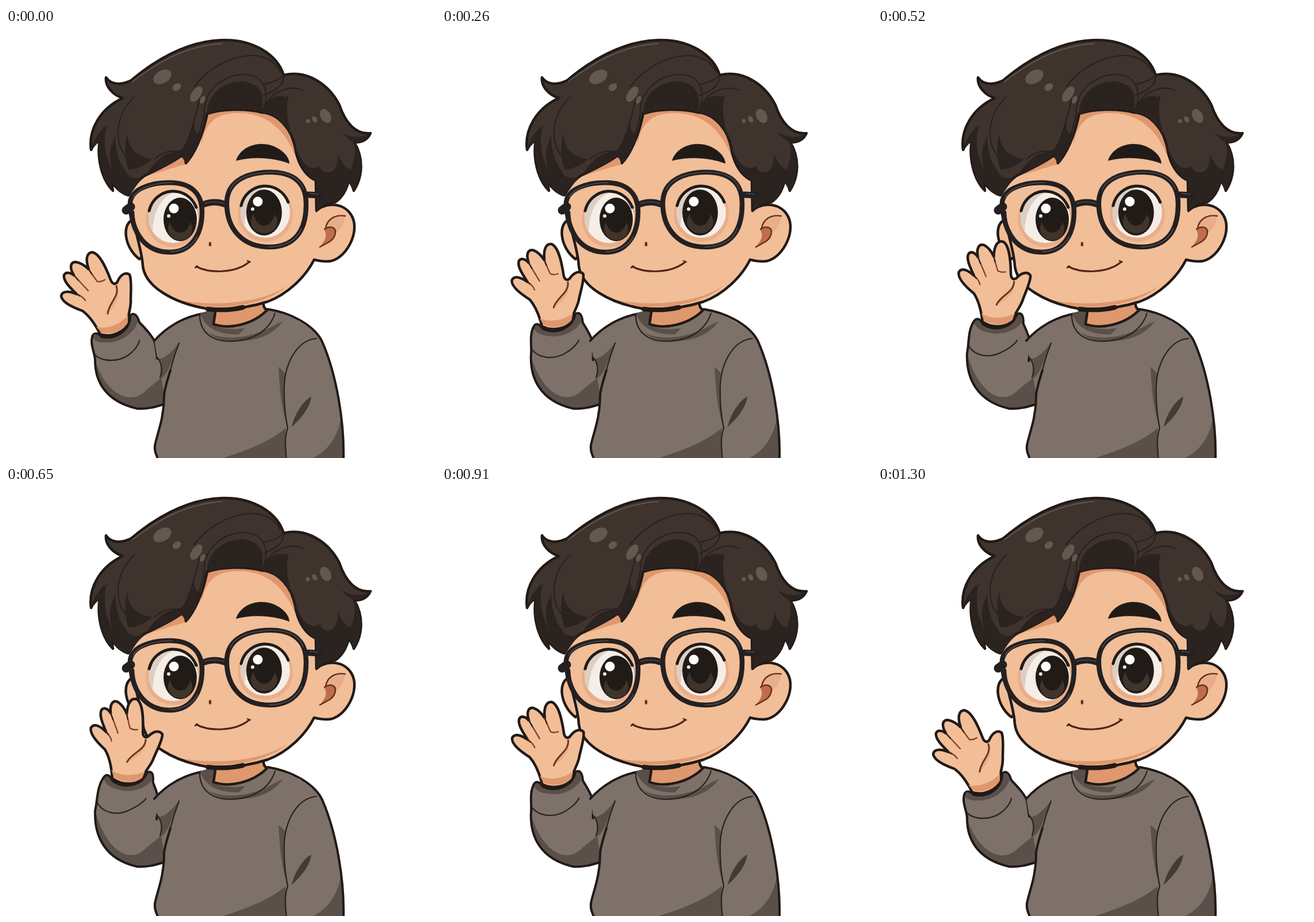
Write an HTML page that moves like this. It is 748 by 748 pixels and loops after 1.43 s.

```html
<!DOCTYPE html>
<html lang="en">
<head>
<meta charset="utf-8">
<title>Waving character</title>
<style>
  html, body { margin: 0; width: 100%; height: 100%; overflow: hidden; background: #fff; }
  svg { display: block; width: 100vw; height: 100vh; }
  .ink { fill: none; stroke: #211a17; stroke-width: 4; }
  .fine { fill: none; stroke: #2a211d; stroke-width: 2.2; }
  .edge { stroke: #211a17; stroke-width: 4.5; }
  .wool { fill: #7e716a; }
  .woolShade { fill: #5b4f49; }
  .skin { fill: #f1be98; }
  .skinShade { fill: #df986d; }
  .blush { fill: #e8ae89; }
  .hair { fill: #3f332e; }
  .hairShade { fill: #2b2320; }
  .shine { fill: #65584f; }
  .crease { fill: none; stroke: #8b4229; stroke-width: 2.4; }
  .dark { fill: #211b18; }
  .lid { fill: none; stroke: #211b18; stroke-width: 5; }
  .frame { fill: none; stroke: #242021; stroke-width: 8.5; }
  .glint { fill: none; stroke: #514b4a; stroke-width: 1.6; }
</style>
</head>
<body>
<svg viewBox="0 0 748 748" stroke-linecap="round" stroke-linejoin="round">
  <g id="sleeve">
    <path class="wool" data-bend="M150 537 C146 552 155 565 155 579 C155 612 171 649 228 662 C245 663 258 660 276 654 L330 600 L310 515 L258 544 C251 531 239 519 232 512 C230 502 225 496 217 498 C205 520 180 536 150 537 Z"/>
    <path class="woolShade" data-bend="M155 579 C176 640 218 657 244 630 C257 619 268 611 281 598 L275 655 C256 660 245 663 228 662 C171 649 155 612 155 579 Z"/>
    <path class="woolShade" data-bend="M150 539 C155 530 161 532 166 537 C190 541 215 527 216 503 C222 494 228 505 229 511 C222 532 200 546 178 547 C163 548 155 545 150 539 Z"/>
    <path class="fine" data-bend="M153 567 C168 583 197 580 213 569 C223 562 231 551 232 543"/>
    <path class="ink" data-bend="M276 654 C258 660 245 663 228 662 C171 649 155 612 155 579 C155 565 146 552 150 537 C152 530 159 529 166 537 C190 543 217 526 216 500 C224 493 229 502 232 512 C239 519 251 531 258 544 C261 555 262 566 263 575"/>
  </g>

  <g id="body">
    <path class="wool" d="M341 497 C308 503 278 521 258 544 L263 573 C270 586 272 594 270 607 L275 640 C275 680 263 705 259 726 C258 738 262 743 265 752 H587 C589 690 580 630 555 560 C545 523 500 501 455 489 Z"/>
    <path class="woolShade" d="M301 548 C291 568 285 600 270 610 C272 596 272 584 264 576 C282 573 289 561 301 548 Z"/>
    <path class="woolShade" d="M371 750 C420 735 462 718 486 696 L488 750 Z M530 750 C561 737 577 710 583 677 C588 705 588 730 587 750 Z"/>
    <path class="woolShade" d="M474 589 C476 625 478 660 490 695 L484 645 C483 625 484 610 485 600 Z"/>
    <path style="fill:#453a35" d="M497 694 C501 674 516 649 531 641 C529 661 513 679 497 694 Z"/>
    <path class="ink" d="M341 497 C308 503 278 521 258 544 M286 595 C280 616 275 630 275 640 C275 680 263 705 259 726 C258 738 262 743 265 752 M455 489 C500 496 540 521 551 548 C575 604 589 686 587 752"/>
    <path class="fine" d="M301 548 Q292 571 286 595 M540 540 C506 543 486 583 484 621 C483 660 487 680 490 696 C484 712 486 732 488 750 M263 573 C272 583 272 598 268 608"/>
    <path class="woolShade" d="M337 497 C337 512 343 522 352 530 C381 545 430 540 470 515 L482 510 C470 526 452 538 430 542 C390 550 340 545 337 497 Z"/>
    <path class="wool" d="M345 496 C347 516 360 532 390 535 C425 536 451 519 464 499 L451 488 L360 493 Z"/>
    <path class="woolShade" d="M337 496 L363 489 L361 515 C370 523 391 526 416 522 L405 533 C367 533 347 522 337 496 Z"/>
    <path class="fine" d="M337 497 C336 529 358 545 390 545 C432 544 459 525 468 496"/>
    <path class="skinShade edge" d="M366 481 L361 515 C388 525 429 516 454 491 C448 487 447 482 448 469 Z"/>
  </g>

  <g id="head">
    <path class="skin edge" d="M223 333 C201 337 204 381 232 402 L246 390 Z"/>
    <path class="skin edge" d="M535 322 C552 302 587 302 601 326 C618 354 590 406 559 406 C545 406 537 404 529 400 Z"/>
    <path class="blush" d="M555 352 C556 332 568 324 589 326 C591 342 575 359 573 356 Z"/>
    <path d="M553 350 C561 341 573 345 573 355 C573 371 557 374 546 381 C556 369 560 360 553 350 Z" fill="#c06d4e"/>
    <path class="crease" d="M556 348 C559 332 573 324 590 327 M554 350 C567 342 574 349 573 356 C571 372 556 374 546 381" style="stroke:#64301f"/>
    <path class="skin" d="M221 285 C218 335 236 373 238 414 C242 450 291 478 348 488 C385 491 421 487 455 476 C490 463 521 433 536 403 L541 285 C531 180 466 125 390 125 C310 128 223 210 221 285 Z"/>
    <path class="skinShade" d="M280 468 C340 486 440 483 490 448 C455 479 401 487 348 485 C320 480 297 475 280 468 Z"/>
    <path class="edge" fill="none" d="M221 320 C222 353 236 381 238 414 C242 450 291 478 348 488 C385 491 421 487 455 476 C490 463 521 433 536 403"/>
    <path d="M351 489 C368 491 391 491 412 486" fill="none" stroke="#211a17" stroke-width="8"/>
    <path class="skinShade" d="M340 203 C346 166 365 149 400 148 C450 146 482 173 502 219 C518 246 526 255 537 262 L520 180 L440 135 L340 135 Z"/>
    <path class="skinShade" d="M238 259 C263 243 293 229 315 221 L313 237 C290 243 261 253 238 259 Z"/>

    <path class="hair edge" d="M174 86 C183 99 200 100 218 91 C256 59 310 23 376 21 C429 19 472 46 483 82 C523 72 562 98 580 134 C590 164 608 186 634 183 C629 194 619 199 606 199 C622 226 621 258 605 283 C603 275 600 270 596 266 C592 283 584 295 573 303 C560 303 548 310 540 318 L539 265 C520 257 507 235 503 208 C498 179 475 149 446 147 C414 139 375 141 350 149 C342 188 328 219 313 235 C313 228 309 224 305 222 C293 232 262 247 243 256 C230 263 222 277 213 291 C202 288 193 281 183 267 L186 283 C166 263 158 226 163 195 C156 200 151 205 148 212 C143 177 164 140 203 122 C185 116 172 101 174 86 Z"/>
    <path class="hairShade" d="M148 211 C154 190 163 179 176 170 C168 192 172 224 185 248 C176 216 183 205 190 188 C190 212 197 235 208 248 C210 258 222 264 238 259 L213 291 C199 287 190 278 183 267 L186 283 C166 261 158 226 163 195 Z"/>
    <path class="hairShade" d="M212 182 C210 203 222 224 255 228 C240 240 225 246 213 246 C206 226 205 202 212 182 Z M245 254 C258 230 282 217 306 211 C316 196 322 182 326 163 C329 182 333 188 341 181 C334 205 325 222 313 235 L305 222 C290 235 264 247 245 254 Z"/>
    <path class="hairShade" d="M350 149 C349 117 377 93 409 93 C438 94 453 112 445 146 C416 138 380 140 350 149 Z M446 146 C451 121 472 115 489 120 C483 147 493 188 514 233 C509 228 505 216 503 208 C498 179 475 149 446 147 Z"/>
    <path class="hairShade" d="M507 214 C517 240 531 249 547 240 C548 250 558 254 568 249 C576 241 578 230 577 217 C583 234 590 243 600 246 C606 231 608 215 606 199 C622 226 621 258 605 283 L596 266 C592 283 584 295 573 303 C560 303 548 310 540 318 L539 265 C524 259 512 241 507 214 Z M584 180 C597 191 613 193 632 184 C628 193 619 199 606 199 C597 195 590 190 584 180 Z"/>
    <path class="fine" d="M483 82 C484 98 471 109 448 117 M483 82 C474 92 459 96 447 98 M327 102 C351 72 386 50 424 48 C449 46 470 60 477 76 M345 149 C342 108 381 78 418 81 C448 83 461 111 446 146 M363 143 C362 118 376 102 397 99 M382 141 C383 121 390 109 403 101 M399 96 C424 101 431 120 429 141 M411 93 C439 103 446 120 440 144 M449 139 C459 113 490 98 516 108 M490 119 C481 154 500 211 519 239 M224 119 C194 147 185 191 207 222 M337 123 C329 157 322 183 309 211 M345 149 C339 179 329 206 313 228 M170 174 C162 191 166 216 173 234"/>
    <path class="fine" d="M220 93 C261 61 312 31 376 27" style="stroke:#62554d"/>
    <path class="fine" d="M252 249 C266 224 285 213 309 218 M258 228 C276 213 294 211 310 220"/>
    <g class="shine">
      <ellipse cx="272" cy="85" rx="17" ry="11" transform="rotate(-30 272 85)"/>
      <ellipse cx="297" cy="103" rx="8" ry="6" transform="rotate(-35 297 103)"/>
      <ellipse cx="331" cy="115" rx="8" ry="15" transform="rotate(34 331 115)"/>
      <ellipse cx="342" cy="125" rx="4" ry="7" transform="rotate(28 342 125)"/>
      <ellipse cx="556" cy="153" rx="9" ry="13" transform="rotate(-28 556 153)"/>
      <ellipse cx="537" cy="159" rx="4" ry="6" transform="rotate(-28 537 159)"/>
      <circle cx="525" cy="162" r="3.5"/>
    </g>

    <path class="dark" d="M400 231 C408 206 438 196 464 205 C484 213 493 226 493 236 C466 225 429 223 400 231 Z"/>
    <g id="eyes"></g>

    <path class="frame" d="M216 303 C219 281 248 269 285 269 C322 269 341 288 341 320 C341 362 320 390 285 390 C244 390 218 360 216 303 Z"/>
    <path class="frame" d="M384 305 C384 270 412 254 450 251 C496 248 522 266 522 305 C523 355 500 381 458 381 C412 381 384 350 384 305 Z"/>
    <path class="frame" style="stroke-width:11" d="M343 307 Q363 299 382 307 M526 290 L547 291"/>
    <path class="frame" style="stroke-width:15" d="M209 317 L217 311"/>
    <path class="glint" d="M221 294 C231 277 260 269 289 269 M390 281 C400 259 428 253 455 251 C488 249 511 260 517 280 M346 305 Q362 300 379 305 M529 288 L543 289 M285 389 C307 389 326 378 333 362 M457 381 C489 380 507 367 514 348"/>
    <ellipse cx="355" cy="376" rx="2.3" ry="4" fill="#6c3020"/>
    <path d="M331 415 C354 427 399 427 423 407" fill="none" stroke="#542217" stroke-width="3.2"/>
    <path class="crease" d="M329 417 L333 414 M420 405 L425 407" style="stroke:#542217"/>
  </g>

  <g id="hand">
    <path class="skin edge" d="M164 533 C153 511 144 500 133 492 C119 487 97 478 96 466 C98 456 111 458 123 463 C113 453 99 440 101 430 C104 423 113 426 118 430 C110 417 112 407 121 407 C129 408 138 414 144 420 C138 403 140 391 150 390 C163 392 174 417 182 438 C185 446 191 447 194 441 C199 429 208 424 215 429 C219 438 217 457 217 473 C218 487 211 500 213 512 C209 528 183 539 164 533 Z"/>
    <path class="skinShade" d="M157 520 C176 525 199 515 212 500 L212 512 C206 525 184 534 166 530 Z"/>
    <path class="blush" d="M177 497 C178 480 196 467 193 449 C200 464 193 482 177 497 Z"/>
    <path class="crease" d="M123 463 C129 465 134 468 138 474 M118 430 L143 457 M144 420 C149 427 154 435 159 441 Q166 442 172 438"/>
    <path class="crease" d="M177 497 C178 479 198 467 192 449" style="stroke:#713321;stroke-width:3"/>
    <path class="fine" d="M123 463 L128 466 M118 430 L126 439 M144 420 L149 428"/>
  </g>
</svg>
<script>
const STEP = 130;
const ANGLES = [0, 7, 12.2, 17, 20, 22.8, 18.5, 12.4, 10, 7, 0];
const PIVOT = { x: 236, y: 572 };
const hand = document.getElementById('hand');
const sleeves = [...document.querySelectorAll('[data-bend]')];

const eye = (x, y, irisX, irisY, rx, ry) => `
  <ellipse class="blush" cx="${x}" cy="${y + 3}" rx="48" ry="48"/>
  <ellipse cx="${x}" cy="${y}" rx="43" ry="44" fill="#f5eee6"/>
  <path d="M${x - 43} ${y} A43 44 0 0 1 ${x} ${y - 44} Q${x - 34} ${y - 28} ${x - 36} ${y + 24} Q${x - 43} ${y + 12} ${x - 43} ${y} Z" fill="#ddcfc5"/>
  <ellipse class="dark" cx="${irisX}" cy="${irisY}" rx="${rx}" ry="${ry}"/>
  <ellipse cx="${irisX}" cy="${irisY + 16}" rx="${rx - 8}" ry="20" fill="#40342b"/>
  <ellipse class="dark" cx="${irisX}" cy="${irisY - 1}" rx="18" ry="24"/>
  <circle cx="${irisX - 11}" cy="${irisY - 19}" r="8.5" fill="#fff"/>
  <circle cx="${irisX - 20}" cy="${irisY - 6}" r="3" fill="#eee5da"/>
  <path class="lid" d="M${x - 42} ${y - 12} A43 44 0 0 1 ${x + 40} ${y - 18}"/>`;
document.getElementById('eyes').innerHTML =
  eye(291, 330, 303, 333, 29, 38) + eye(451, 321, 449, 321, 31, 40);

// The forearm turns fully at the cuff and not at all at the elbow.
function bendPoint(x, y, degrees) {
  const reach = Math.min(1, Math.max(0, (650 - y) / 105));
  const inner = Math.min(1, Math.max(0, (285 - x) / 25));
  const a = degrees * reach * reach * inner * Math.PI / 180;
  const dx = x - PIVOT.x, dy = y - PIVOT.y;
  return [
    PIVOT.x + dx * Math.cos(a) - dy * Math.sin(a),
    PIVOT.y + dx * Math.sin(a) + dy * Math.cos(a)
  ];
}

function bendPath(path, degrees) {
  return path.replace(/(\d+) (\d+)/g, (_, x, y) =>
    bendPoint(+x, +y, degrees).map(n => n.toFixed(1)).join(' '));
}

function render(ms) {
  const degrees = ANGLES[Math.floor(ms / STEP) % ANGLES.length];
  hand.setAttribute('transform', `rotate(${degrees} ${PIVOT.x} ${PIVOT.y})`);
  for (const part of sleeves) part.setAttribute('d', bendPath(part.dataset.bend, degrees));
}

const start = performance.now();
function tick() {
  render(performance.now() - start);
  requestAnimationFrame(tick);
}
tick();
</script>
</body>
</html>
```
